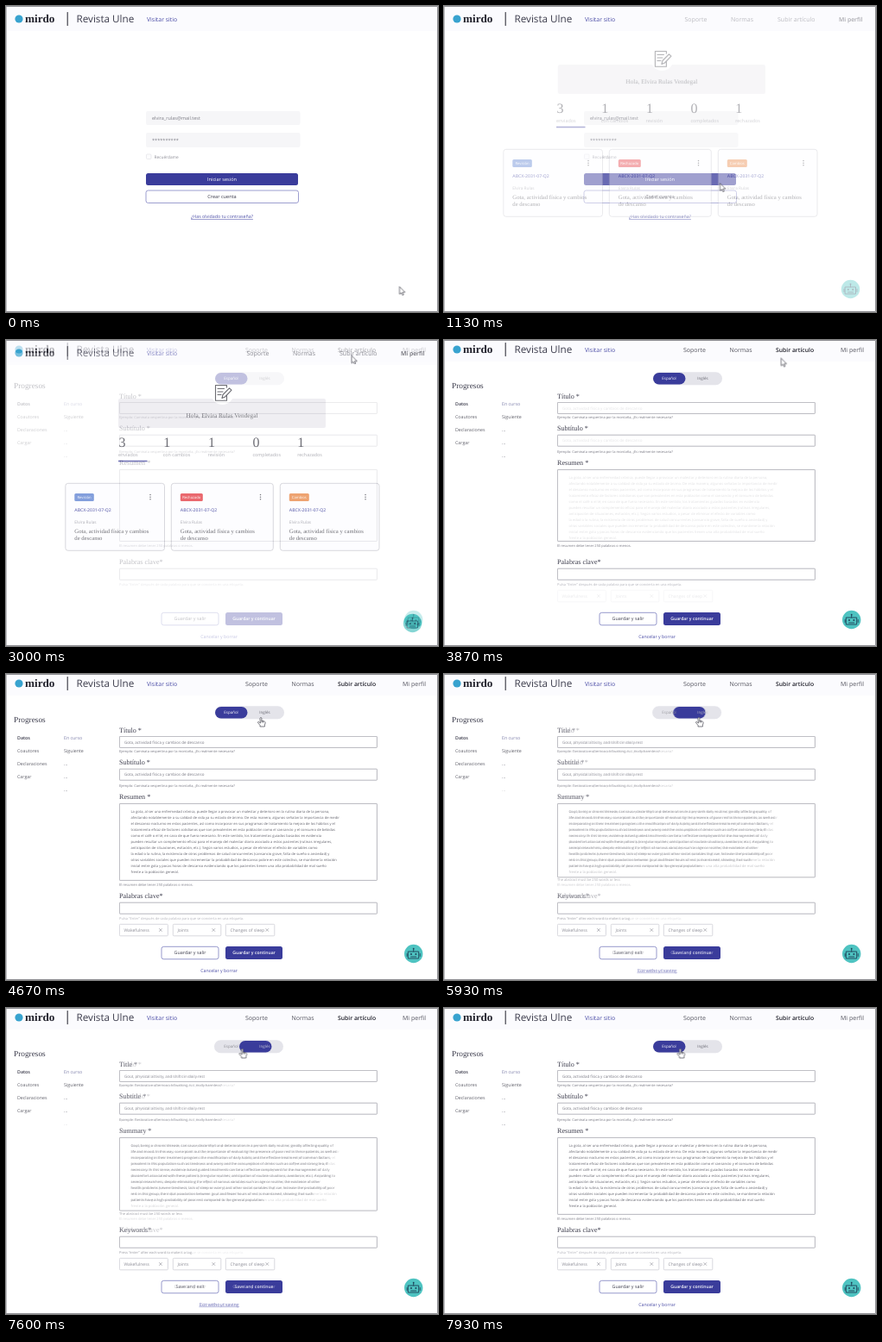
These frames come from a looping animation (500x355 px, 8 s). An HTML page:

```html
<!DOCTYPE html>
<html lang="es">
<head>
<meta charset="utf-8">
<title>Portal de artículos</title>
<style>
html, body { margin: 0; width: 100%; height: 100%; overflow: hidden; background: #fff; }
svg { display: block; width: 500px; height: 355px; }
text { font-family: "Open Sans", sans-serif; text-rendering: geometricPrecision; white-space: pre; }
.serif { font-family: "Liberation Serif", serif; }
.b { font-weight: 600; }
.u { text-decoration: underline; }
.mid { text-anchor: middle; }

.login, .dash, .greet, .form, .es, .en, .fill, .hint, .area, .thumb, .pill, .mouse, .arrow, .hand {
  animation: 8s linear infinite;
}
.login { animation-name: login; }
.dash { animation-name: dash; }
.greet { animation-name: greet; }
.form { animation-name: form; }
.es { animation-name: es; }
.en { animation-name: en; }
.fill { animation-name: fill; }
.hint { animation-name: hint; }
.area { animation-name: area; }
.thumb { animation-name: thumb; }
.pill { animation-name: pill; }
.mouse { animation-name: mouse; }
.arrow { animation-name: arrow; }
.hand { animation-name: hand; }

@keyframes login { 0%, 12.6% { opacity: 1 } 19.1%, 100% { opacity: 0 } }
@keyframes dash {
  0%, 12.5% { opacity: 0; animation-timing-function: ease-out }
  19.1%, 100% { opacity: 1 }
}
@keyframes greet {
  0%, 12.5% { transform: translateX(3px); animation-timing-function: ease-out }
  19.1%, 100% { transform: none }
}
@keyframes form { 0%, 37.1% { opacity: 0 } 38.4%, 100% { opacity: 1 } }
@keyframes es {
  0%, 71.7% { opacity: 1; animation-timing-function: ease-out }
  77.5%, 94.1% { opacity: 0; animation-timing-function: ease-out }
  99.1%, 100% { opacity: 1 }
}
@keyframes en {
  0%, 71.7% { opacity: 0; animation-timing-function: ease-out }
  77.5%, 94.1% { opacity: 1; animation-timing-function: ease-out }
  99.1%, 100% { opacity: 0 }
}
@keyframes fill { 0%, 46.75% { opacity: 0 } 55%, 100% { opacity: 1 } }
@keyframes hint { 0%, 48.4% { transform: none } 55%, 100% { transform: translateY(5.8px) } }
@keyframes area {
  0%, 48.4% { height: 83px }
  55%, 71.7% { height: 89px; animation-timing-function: ease-out }
  77.5%, 94.1% { height: 83px; animation-timing-function: ease-out }
  99.1%, 100% { height: 89px }
}
@keyframes thumb {
  0%, 71.7% { transform: none; animation-timing-function: ease-out }
  77.5%, 94.1% { transform: translateX(39px); animation-timing-function: ease-out }
  99.1%, 100% { transform: none }
}
@keyframes pill {
  0%, 71.7% { transform: none; animation-timing-function: ease-out }
  77.5%, 94.1% { transform: translateX(-1.5px); animation-timing-function: ease-out }
  99.1%, 100% { transform: none }
}
@keyframes mouse {
  0% { transform: translate(455.5px, 326px); animation-timing-function: cubic-bezier(.35,.1,.4,1) }
  10%, 23.3% { transform: translate(319.5px, 206px); animation-timing-function: cubic-bezier(.35,.1,.4,1) }
  34.1%, 46.9% { transform: translate(400px, 18.5px); animation-timing-function: cubic-bezier(.35,.1,.4,1) }
  57.5%, 86.6% { transform: translate(295px, 50px); animation-timing-function: ease-out }
  90%, 100% { transform: translate(273.5px, 47px) }
}
@keyframes arrow { 0%, 58.3% { opacity: 1 } 58.31%, 100% { opacity: 0 } }
@keyframes hand { 0%, 58.3% { opacity: 0 } 58.31%, 100% { opacity: 1 } }
</style>
</head>
<body>
<svg id="stage" viewBox="0 0 500 355"></svg>
<script>
const INK = '#3c3c4c', GREY = '#8a8a94', BLUE = '#3a3c9b', LINK = '#4b4da6';

const text = (x, y, size, str, color = INK, cls = '') =>
  `<text x="${x}" y="${y}" font-size="${size}" fill="${color}" class="${cls}">${str}</text>`;
const rect = (x, y, w, h, fill, r = 0, stroke = 'none', cls = '') =>
  `<rect x="${x}" y="${y}" width="${w}" height="${h}" rx="${r}" fill="${fill}" stroke="${stroke}" stroke-width=".8" class="${cls}"/>`;
const group = (cls, ...parts) => `<g class="${cls}">${parts.join('')}</g>`;
const shift = (x, y, body) => `<g transform="translate(${x} ${y})">${body}</g>`;
const path = (d, stroke, width = 1, fill = 'none') =>
  `<path d="${d}" fill="${fill}" stroke="${stroke}" stroke-width="${width}" stroke-linejoin="round" stroke-linecap="round"/>`;
const dot = (x, y, r, fill) => `<circle cx="${x}" cy="${y}" r="${r}" fill="${fill}"/>`;
const lines = (x, y, step, size, list, color, cls) =>
  list.map((s, i) => text(x, y + i * step, size, s, color, cls)).join('');

const header = () =>
  rect(1, 1, 498, 28, '#fbfbfe') + dot(15, 15, 4.6, '#38a3cf') +
  text(22, 19.3, 13.2, 'mirdo', '#22222c', 'serif" font-weight="700') +
  path('M71.2 7.5V22.5', '#33333c', 1.1) +
  text(81.5, 19, 11.7, 'Revista Ulne', INK) +
  text(163, 17.7, 6.9, 'Visitar sitio', LINK);

const nav = (xs, active) => ['Soporte', 'Normas', 'Subir artículo', 'Mi perfil']
  .map((s, i) => text(xs[i], 17.7, i === active ? 6.8 : 7, s, i === active ? '#22222c' : '#55555f', i === active ? 'b' : ''))
  .join('');

const robot = (x, y) => shift(x, y,
  dot(0, 0, 10.7, '#4ec3c1') +
  path('M-6-2.5H6V5.5H-6ZM0-2.5V-5.5M-7.5 0V3M7.5 0V3M-3 3.5H3', '#1f4258', .9) +
  dot(0, -5.8, .9, '#1f4258') + dot(-2.7, .6, 1, '#1f4258') + dot(2.7, .6, 1, '#1f4258'));

const login = () => group('login',
  rect(162, 122, 178.5, 16, '#f6f6f8', 2),
  text(169, 131.6, 5.5, 'elvira_rulas@mail.test', '#7d7d86'),
  rect(162, 147, 178.5, 17, '#f6f6f8', 2),
  text(169, 158.2, 5.6, '**********', '#7d7d86'),
  rect(162.5, 172, 5.5, 5.5, '#fcfcfd', 1, '#e6e6ea'),
  text(171.5, 176.6, 4.8, 'Recuérdame', '#8f8f98'),
  rect(162, 194, 176, 14, BLUE, 2.5),
  text(250, 203, 5.6, 'Iniciar sesión', '#fff', 'mid'),
  rect(162, 214, 176.5, 14.5, '#fff', 2.5, '#8486c4'),
  text(250, 223, 5.6, 'Crear cuenta', INK, 'mid'),
  text(250, 246.3, 5.3, '¿Has olvidado tu contraseña?', LINK, 'mid u'));

const card = (x, w, tag, tagW, color, dots) =>
  rect(x, 166.3, w, 78, '#fcfcff', 3, '#b9b9c2') +
  rect(x + 10.5, 178, tagW, 9, color, 1.5) +
  text(x + 10.5 + tagW / 2, 184.1, 4.2, tag, '#fff', 'mid') +
  [179.6, 182.2, 184.8].map(y => dot(dots, y, .75, '#33333c')).join('') +
  text(x + 10.5, 199, 5.1, 'ABCX-2031-07-Q2', BLUE, 'b') +
  text(x + 10.5, 213, 4.8, 'Elvira Rulas', GREY) +
  lines(x + 10.5, 224.2, 8, 6.7, ['Gota, actividad física y cambios', 'de descanso'], '#33333c', 'serif');

const stats = [[3, 'enviados'], [1, 'con cambios'], [1, 'revisión'], [0, 'completados'], [1, 'rechazados']];

const dash = () => group('dash',
  nav([278.5, 332, 386, 457], 3),
  group('greet',
    rect(130, 68, 240, 34, '#e8e7ec', 2),
    dot(250.5, 62, 13, '#fff'),
    path('M255.5 64V70.3H242.5V52.5H255.5V55M245 56.5H252.5M245 60H251M245 63.5H249', '#2b2b34', 1.1),
    path('M250 67.5L251 63.5L258.5 55.8L261 58.2L253.5 66Z', '#2b2b34', 1.1, '#fff'),
    text(250, 89.8, 7.3, 'Hola, Elvira Rulas Vendegal', '#44444e', 'serif mid')),
  stats.map(([n, label], i) =>
    text(130.5 + i * 51.7, 123.8, 16, n, '#2f2f3a', 'serif') +
    text(130 + i * 51.8, 134.6, 5.4, label, GREY)).join(''),
  rect(130, 139.7, 33.5, 1.6, BLUE),
  card(68.8, 114.7, 'Revisión', 22.5, '#4b73cc', 167),
  card(191.3, 118, 'Rechazado', 26, '#e0242c', 294.5),
  card(317.3, 114.7, 'Cambios', 23, '#e67a31', 416),
  robot(470.5, 328.5));

const copy = {
  es: {
    labels: ['Título *', 'Subtítulo *', 'Resumen *', 'Palabras clave*'],
    example: 'Ejemplo: Caminata vespertina por la montaña, ¿Es realmente necesaria?',
    title: 'Gota, actividad física y cambios de descanso',
    limit: 'El resumen debe tener 250 palabras o menos.', limitY: 240.3,
    enter: 'Pulsa “Enter” después de cada palabra para que se convierta en una etiqueta.',
    buttons: ['Guardar y salir', 'Guardar y continuar', 'Cancelar y borrar'],
    body: [
      'La gota, al ser una enfermedad crónica, puede llegar a provocar un malestar y deterioro en la rutina diaria de la persona,',
      'afectando notablemente a su calidad de vida ya su estado de ánimo. De esta manera, algunos señalan la importancia de medir',
      'el descanso nocturno en estos pacientes, así como incorporar en sus programas de tratamiento la mejora de los hábitos y el',
      'tratamiento eficaz de factores cotidianos que son prevalentes en esta población como el cansancio y el consumo de bebidas',
      'como el café o el té, en caso de que fuera necesario. En este sentido, los tratamientos guiados basados en evidencia',
      'pueden resultar un complemento eficaz para el manejo del malestar diario asociado a estos pacientes (rutinas irregulares,',
      'anticipación de situaciones, evitación, etc.). Según varios estudios, a pesar de eliminar el efecto de variables como',
      'la edad o la rutina, la existencia de otros problemas de salud concurrentes (cansancio grave, falta de sueño o ansiedad) y',
      'otras variables sociales que pueden incrementar la probabilidad de descanso pobre en este colectivo, se mantiene la relación',
      'inicial entre gota y pocas horas de descanso evidenciando que los pacientes tienen una alta probabilidad de mal sueño',
      'frente a la población general.']
  },
  en: {
    labels: ['Title *', 'Subtitle *', 'Summary *', 'Keywords*'],
    example: 'Example: Restorative afternoon hillwalking, is it really harmless?',
    title: 'Gout, physical activity, and shifts in daily rest',
    limit: 'The abstract must be 250 words or less', limitY: 239.5,
    enter: 'Press “enter” after each word to make it a tag.',
    buttons: ['Save and exit', 'Save and continue', 'Exit without saving'],
    body: [
      'Gout, being a chronic disease, can cause discomfort and deterioration in a person’s daily routine, greatly affecting quality of',
      'life and mood. In this way, some point out the importance of evaluating the presence of poor rest in these patients, as well as',
      'incorporating in their treatment programs the modification of daily habits and the effective treatment of common factors',
      'prevalent in this population such as tiredness and worry and the consumption of drinks such as coffee and strong tea, if',
      'necessary. In this sense, evidence-based guided treatments can be an effective complement for the management of daily',
      'discomfort associated with these patients (irregular routines, anticipation of routine situations, avoidance, etc.). According to',
      'several researchers, despite eliminating the effect of various variables such as age or routine, the existence of other',
      'health problems (severe tiredness, lack of sleep or worry) and other social variables that can increase the probability of poor',
      'rest in this group, the initial association between gout and fewer hours of rest is maintained, showing that such',
      'patients have a high probability of poor rest compared to the general population.']
  }
};

const fields = lang => {
  const c = copy[lang], en = lang === 'en';
  const [hint, fill] = en ? ['', ''] : ['hint', 'fill'];
  const tone = i => i === +en ? '#fff' : '#62626c';
  return group(lang,
    [67.6, 104.9, 144.8, 259.8].map((y, i) => text(131, y, 8.1, c.labels[i], INK, 'serif')).join(''),
    text(260.5, 46.4, 4.5, 'Español', tone(0), 'mid'),
    text(299.5, 46.4, 4.5, 'Inglés', tone(1), 'mid'),
    text(131, 91.3, 4, c.example, '#777782'),
    text(131, 131.1, 4, c.example, '#777782'),
    group(hint, text(131, c.limitY, 4, c.limit, '#777782')),
    text(131, 285.2, 4, c.enter, en ? '#85858f' : '#b4b4bc'),
    group(fill,
      text(137, 80.5, 4.5, c.title, '#777782'),
      text(137, 118.3, 4.5, c.title, '#777782'),
      lines(144.5, 161.4, 6.97, 4.1, c.body, '#62626c')),
    text(213, 325.4, 5.4, c.buttons[0], INK, 'mid'),
    text(287, 325.4, 5.1, c.buttons[1], '#fff', 'mid b'),
    text(246.5, 345.6, 5.3, c.buttons[2], LINK, en ? 'mid u' : 'mid'));
};

const tag = (x, w, str) =>
  rect(x, 290.3, w, 13.5, '#fff', 1, '#cfcfd6') + text(x + 5.2, 298.8, 5, str, GREY) +
  path(`M${x + w - 10} 295.5l3 3m0-3l-3 3`, GREY, .6);

const form = () => group('form',
  rect(0, 0, 500, 355, '#fff'),
  shift(0, -4, header() + nav([277, 330.5, 384, 459], 2)),
  text(9, 55.8, 9.3, 'Progresos', INK, 'serif'),
  text(13, 75.8, 5.3, 'Datos', INK, 'b'),
  lines(13, 90.8, 15, 5.3, ['Coautores', 'Declaraciones', 'Cargar'], '#62626c'),
  text(67, 75.8, 5.3, 'En curso', '#8182ac'),
  lines(67, 90.8, 15, 5.3, ['Siguiente', '...', '...'], '#62626c'),
  group('es', text(67, 135.8, 5.3, '...', '#62626c')),
  rect(242, 37.3, 80, 15, '#e4e4ea', 7.5, 'none', 'pill'),
  rect(242, 38, 37.5, 13.6, BLUE, 6.8, 'none', 'thumb'),
  [72.4, 110.2, 265.2].map(y => rect(131.4, y, 298, 13, '#fff', .5, '#a5a5ae')).join(''),
  rect(131.4, 150.4, 298, 83, '#fff', .5, '#a5a5ae', 'area'),
  group('fill', tag(131.4, 56, 'Wakefulness'), tag(193.3, 55.5, 'Joints'), tag(254.3, 56.5, 'Changes of sleep')),
  rect(180, 316.3, 66, 14.5, '#fff', 2.5, '#7c7ebf'),
  rect(254, 316, 66, 15, BLUE, 2.5),
  fields('es'), fields('en'),
  robot(471.7, 324.5));

const mouse = () => group('mouse',
  group('arrow', path('M0 0V8.4L2 6.7L3.4 9.6L4.8 9L3.4 6.1H6Z', '#44444e', .7, '#fff')),
  group('hand', path('M-.9 1Q0-.4 .9 1V4.2L4.2 5Q5.4 5.5 5.1 7L4.4 9.2V11H-1V9.4L-3.6 6.4Q-3.6 5.2-2.4 5.6L-.9 6.8ZM2.5 4.8V6.2M.9 4.2V6', '#44444e', .7, '#fff')));

document.getElementById('stage').innerHTML =
  rect(0, 0, 500, 355, '#fff') + header() + login() + dash() + form() +
  path('M.5.5H499.5V354.5H.5Z', '#85858b', .9) + mouse();
</script>
</body>
</html>
```
